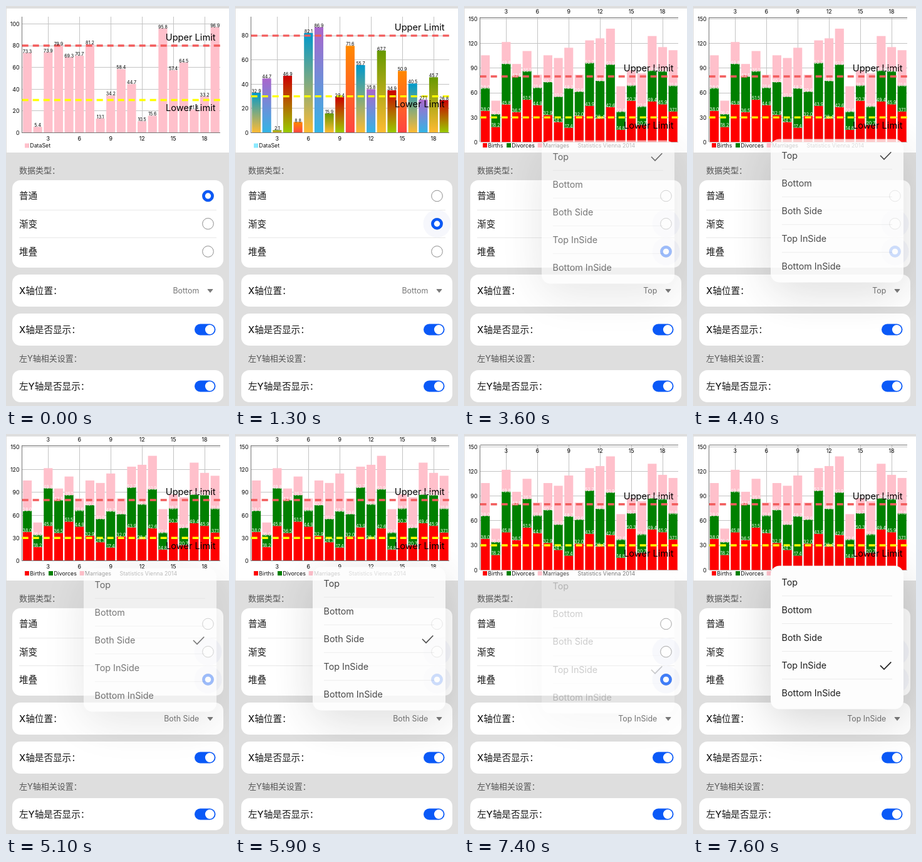
An HTML page for the animation above (8 s loop, 356 by 636 pixels).

```html
<!DOCTYPE html>
<html lang="zh">
<head>
<meta charset="utf-8">
<style>
html, body { margin: 0; width: 100%; height: 100%; overflow: hidden; background: #dedede; }
svg { display: block; width: 356px; height: 636px; font-family: Inter, "Noto Sans CJK SC", "Noto Sans CJK", sans-serif; }
.shadow { filter: blur(36px); }
</style>
</head>
<body>
<svg id="stage" viewBox="0 0 356 636"></svg>
<script>
const NS = 'http://www.w3.org/2000/svg';
const stage = document.getElementById('stage');

function add(parent, tag, attrs = {}, content) {
  const el = document.createElementNS(NS, tag);
  for (const key in attrs) el.setAttribute(key, attrs[key]);
  if (content !== undefined) el.textContent = content;
  return parent.appendChild(el);
}
const group = (parent = stage) => add(parent, 'g');
const rect = (p, x, y, width, height, fill, rx = 0) => add(p, 'rect', { x, y, width, height, fill, rx });
const circle = (p, cx, cy, r, fill, more) => add(p, 'circle', { cx, cy, r, fill, ...more });
const line = (p, x1, y1, x2, y2, stroke, more) => add(p, 'line', { x1, y1, x2, y2, stroke, ...more });
const label = (p, x, y, size, str, fill = '#000', anchor = 'start') =>
  add(p, 'text', { x, y, 'font-size': size, fill, 'text-anchor': anchor }, str);

// ---- chart ----
const LEFT = 25.7, RIGHT = 342, STEP = (RIGHT - LEFT) / 19, BAR = STEP * .85;
const barX = n => LEFT + (n - .5) * STEP;
const TICKS = [3, 6, 9, 12, 15, 18];
const RED = '#ff0000', GREEN = '#008000', PINK = '#ffc0cb', BLUE = '#0a59f7';

const plain = [73.3, 5.4, 73.9, 79.9, 69.3, 70.7, 81.2, 13.1, 34.2, 58.4, 44.7, 10.5, 15.6, 95.8, 57.4, 64.5, 21.4, 33.2, 96.9];
const shaded = [32.9, 44.7, 2.1, 46.9, 8.8, 82.1, 86.9, 15.9, 29.4, 71.6, 55.7, 35.8, 67.7, 34.9, 50.9, 40.5, 27.1, 45.7, 26.8];
const births = [38, 18.2, 45.8, 36.5, 51.5, 44.9, 32.9, 24.3, 17.4, 32, 43.9, 28.4, 42.6, 14.8, 50.3, 20.7, 49.4, 45.9, 37.1];
const divorces = [28, 16, 49.8, 43.5, 35.1, 21.6, 40.4, 31, 48.2, 29.6, 52.7, 46.3, 51.9, 22.6, 18.7, 22.9, 37.9, 40.6, 31.8];
const totals = [105.8, 50.4, 122, 95.2, 111, 82, 105.8, 102.5, 115, 82, 124, 126.5, 138.3, 68, 87.5, 83.6, 129.3, 115.8, 112];

const defs = add(stage, 'defs');
[['#0099cc', '#ffbb33'], ['#aa66cc', '#33b5e5'], ['#669900', '#ffbb33'], ['#cc0000', '#99cc00'], ['#ff8800', '#ff4444']]
  .forEach((pair, i) => {
    const grad = add(defs, 'linearGradient', { id: 'shade' + i, x2: 0, y2: 1 });
    pair.forEach((color, k) => add(grad, 'stop', { offset: k, 'stop-color': color }));
  });

function limit(p, y, name, color, dy) {
  line(p, LEFT, y, RIGHT, y, color, { 'stroke-width': 3.4, 'stroke-dasharray': '10 7' });
  label(p, 334.5, y + dy, 14.6, name, '#000', 'end');
}

// bars: one list of {value, fill, text, ink} segments per column, bottom first
function chart({ bars, peak, unit, top = 17, bottom = 201.5, ticksAt = [214], axes = [bottom], legend, legendY = 221.5 }) {
  const g = group();
  const yOf = v => bottom - v * (bottom - top) / (peak * 1.1);
  const crisp = { 'shape-rendering': 'crispEdges' };
  for (const n of TICKS) line(g, barX(n), top, barX(n), bottom, '#c4c4c4', crisp);
  for (let v = 0; v <= peak * 1.1; v += unit) {
    line(g, LEFT, yOf(v), RIGHT, yOf(v), '#c4c4c4', crisp);
    label(g, 21.5, yOf(v) + 3.4, 8.8, v, '#000', 'end');
  }
  const texts = [];
  bars.forEach((segments, i) => {
    let sum = 0;
    const x = barX(i + 1);
    for (const { value, fill, ink } of segments) {
      const y = yOf(sum + value);
      rect(g, x - BAR / 2, y, BAR, yOf(sum) - y, fill);
      if (ink) texts.push([x, y + (sum ? 1.3 : 0), value.toFixed(1), ink]);
      sum += value;
    }
  });
  line(g, LEFT, top, LEFT, bottom, '#777', crisp);
  for (const y of axes) line(g, LEFT, y, RIGHT, y, '#777', crisp);
  limit(g, yOf(80), 'Upper Limit', '#f25c5c', -8);
  limit(g, yOf(30), 'Lower Limit', '#ffff00', 17.6);
  for (const [x, y, str, ink] of texts) label(g, x, y, 7.1, str, ink, 'middle');
  for (const y of ticksAt) for (const n of TICKS) label(g, barX(n), y, 8.8, n, '#000', 'middle');
  for (const [x, str, fill] of legend) {
    if (fill) rect(g, x - 8.3, legendY - 3.5, 7, 7, fill);
    label(g, x, legendY + 3.2, 8.8, str, fill ? '#111' : '#555');
  }
  return g;
}

rect(stage, 1, 4, 355, 229, '#fff');

const single = (values, fillOf) => values.map((value, i) => [{ value, fill: fillOf(i), ink: '#000' }]);
const stacked = {
  bars: births.map((b, i) => [
    { value: b, fill: RED, ink: '#fff' },
    { value: divorces[i], fill: GREEN, ink: '#fff' },
    { value: totals[i] - b - divorces[i], fill: PINK }
  ]),
  peak: 138.3, unit: 30,
  legend: [[38.3, 'Births', RED], [76.3, 'Divorces', GREEN], [126, 'Marriages', PINK], [181.5, 'Statistics Vienna 2014']]
};
const charts = {
  plain: chart({ bars: single(plain, () => PINK), peak: 96.9, unit: 20, legend: [[38.3, 'DataSet', PINK]], legendY: 222 }),
  shaded: chart({ bars: single(shaded, i => `url(#shade${i % 5})`), peak: 86.9, unit: 20, legend: [[38.3, 'DataSet', '#8ceaff']], legendY: 222 }),
  'Bottom': chart(stacked),
  'Top': chart({ ...stacked, top: 18, bottom: 216.2, ticksAt: [12.4], axes: [18] }),
  'Both Side': chart({ ...stacked, top: 18, ticksAt: [12.4, 214], axes: [18, 201.5] }),
  'Top InSide': chart({ ...stacked, top: 17.5, bottom: 216.2, ticksAt: [30.4], axes: [17.5] })
};

// ---- settings ----
for (const [y, h] of [[277, 139], [427, 51], [489, 51], [579, 51]]) rect(stage, 10, y, 337, h, '#fff', 13);
for (const y of [324.5, 368.5]) line(stage, 21, y, 336, y, '#e8e8e8');
const setting = (y, str) => label(stage, 21, y + 5.4, 14.6, str, '#1a1a1a').setAttribute('font-weight', 500);
const heading = (y, str) => label(stage, 21, y + 4.8, 13, str, '#555');
heading(261, '数据类型：');
heading(560, '左Y轴相关设置：');
setting(452.5, 'X轴位置：');
setting(514.5, 'X轴是否显示：');
setting(604.5, '左Y轴是否显示：');

const radios = ['普通', '渐变', '堆叠'].map((name, i) => {
  const y = 302 + i * 44.2;
  setting(y, name);
  const halo = circle(stage, 322.5, y, 22, '#f6f7fc');
  circle(stage, 322.5, y, 8.8, '#fff', { stroke: '#8c8c8c' });
  const dot = group();
  circle(dot, 322.5, y, 9.3, BLUE);
  circle(dot, 322.5, y, 4.7, '#fff');
  return { halo, dot };
});

for (const y of [514.5, 604.5]) {
  rect(stage, 301, y - 9, 33.5, 18, BLUE, 9);
  circle(stage, 325.3, y, 7.4, '#fff');
}
const choice = label(stage, 308.3, 457, 12.4, '', '#777', 'end');
add(stage, 'path', { d: 'M322 450.5h8l-4 5z', fill: '#7c7c7c', stroke: '#7c7c7c', 'stroke-linejoin': 'round' });

// ---- menu ----
const menu = group();
const shadow = rect(menu, 124, 226, 212, 228, '#000', 14);
shadow.setAttribute('class', 'shadow');
shadow.setAttribute('opacity', .17);
rect(menu, 124, 209.5, 212, 228, '#fdfdfd', 14);
const ITEMS = ['Top', 'Bottom', 'Both Side', 'Top InSide', 'Bottom InSide'];
ITEMS.forEach((name, i) => {
  const y = 235.3 + i * 44.1;
  label(menu, 141.6, y + 5.2, 14.3, name, '#1e1e1e');
  if (i) line(menu, 142, y - 22, 318, y - 22, '#ebebeb');
});
const check = add(menu, 'path', { d: 'M299 235.8l6 6 11.3-11.5', fill: 'none', stroke: '#1e1e1e', 'stroke-width': 1.6 });

// ---- timeline ----
const TICK = 100, LOOP = 8000;
// time, opacity, downward shift
const menuSteps = [
  [0, 0, 0],
  [2800, .22, 6.8], [2900, .8, 2], [3000, 1, 0], [3600, .6, 4], [3700, .12, 7], [3800, 0, 0],
  [4300, .22, 6.8], [4400, .8, 2], [4500, 1, 0], [5100, .6, 4], [5200, 0, 0],
  [5800, .22, 6.8], [5900, .8, 2], [6000, 1, 0], [6700, .85, 2], [6800, .25, 6], [6900, 0, 0],
  [7400, .22, 6.8], [7500, .8, 2], [7600, 1, 0]
];
const chartSteps = [[0, 'plain'], [1000, 'shaded'], [2000, 'Bottom'], [3600, 'Top'], [5100, 'Both Side'], [6700, 'Top InSide']];
const stepAt = (steps, t) => steps.filter(s => s[0] <= t).pop();
const ramp = (t, from, to) => Math.min(1, Math.max(0, (t - from) / (to - from)));

function render(now) {
  const t = Math.floor(now % LOOP / TICK) * TICK;
  const view = stepAt(chartSteps, t)[1];
  for (const key in charts) charts[key].style.display = key === view ? '' : 'none';

  const second = ramp(t, 900, 1200), third = ramp(t, 1900, 2200);
  [1 - second, second - third, third].forEach((on, i) => radios[i].dot.setAttribute('opacity', on));
  [false, t >= 900, t >= 1900].forEach((on, i) => radios[i].halo.setAttribute('opacity', +on));

  const position = ITEMS.includes(view) ? view : 'Bottom';
  if (choice.textContent !== position) choice.textContent = position;
  check.setAttribute('transform', `translate(0 ${ITEMS.indexOf(position) * 44.1})`);

  const [, opacity, shift] = stepAt(menuSteps, t);
  menu.style.display = opacity ? '' : 'none';
  menu.setAttribute('opacity', opacity);
  menu.setAttribute('transform', `translate(0 ${shift})`);
}

const start = performance.now();
function frame() {
  render(performance.now() - start);
  requestAnimationFrame(frame);
}
frame();
</script>
</body>
</html>
```
